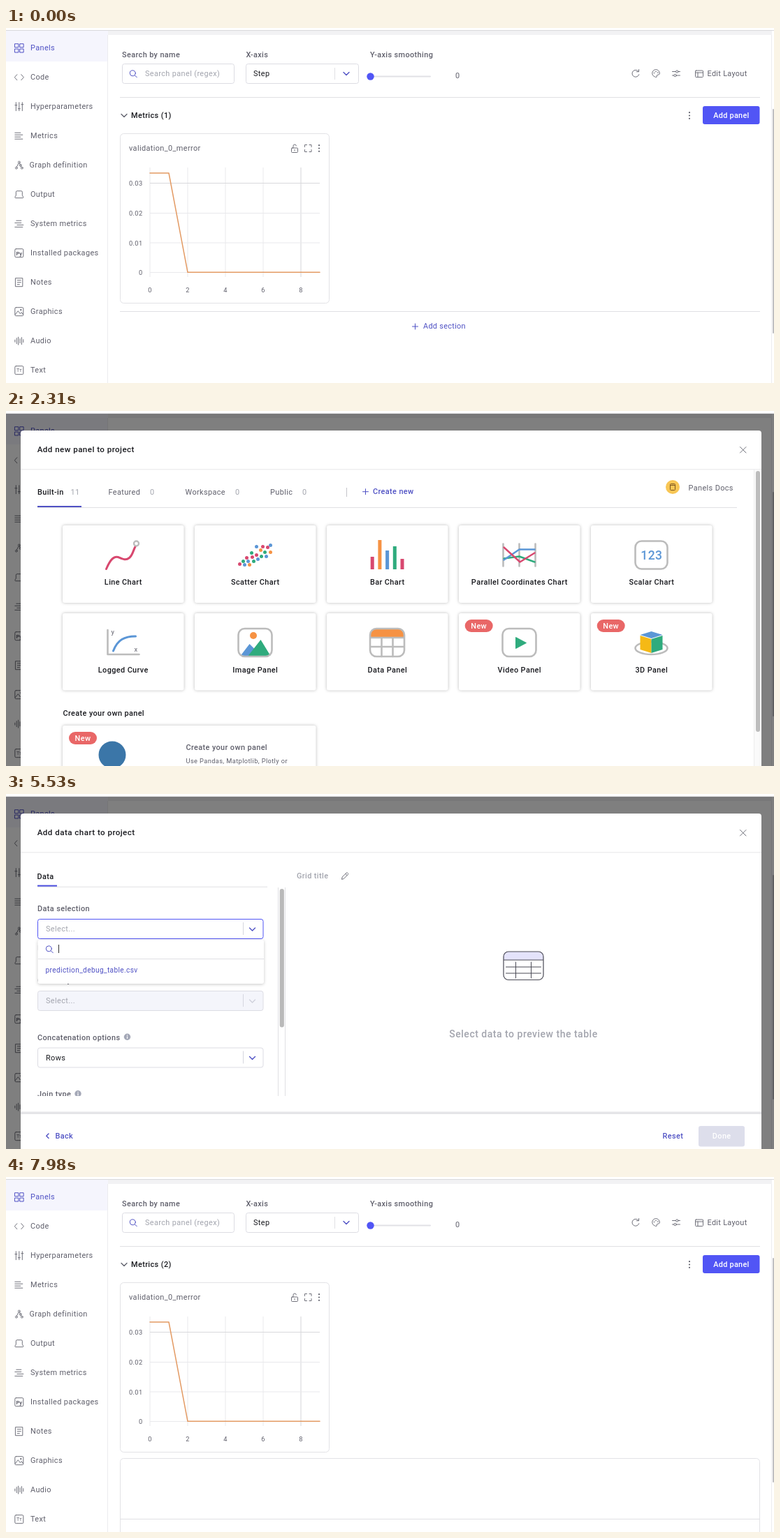
An HTML page for the animation above (8000 ms loop, 1099x509 px).

```html
<!DOCTYPE html>
<html lang="en">
<head>
<meta charset="utf-8">
<title>Add a data panel</title>
<style>
html, body { margin: 0; width: 100%; height: 100%; overflow: hidden; background: #fff; }
svg { display: block; width: 1099px; height: 509px; }
text { font: 10.9px Roboto, Arial, sans-serif; letter-spacing: .38px; fill: #5f5f6b; white-space: pre; }
.m { font-weight: 500; }
.dark { fill: #191a1f; }
.pale { fill: #a3a5ae; }
.brand { fill: #4f51c4; }
.white { fill: #fff; }
.h { font-size: 11.6px; font-weight: 500; letter-spacing: .45px; fill: #191a1f; }
.s { font-size: 9.24px; letter-spacing: .4px; }
.cell { letter-spacing: .2px; fill: #22232a; }
.mid { text-anchor: middle; }
.line { fill: none; stroke: #70717b; stroke-linecap: round; stroke-linejoin: round; }
.blue { stroke: #4f51c4; }
.rule { fill: none; stroke: #e0e0e4; }
.art { fill: none; stroke-width: 2.6; stroke-linecap: round; stroke-linejoin: round; }
.card { fill: #fff; filter: drop-shadow(0 0 2px rgba(0, 0, 0, .27)); }
.fade { animation: fade 8s step-end infinite; }
@keyframes fade {
  0% { opacity: 0; }
  27.125% { opacity: .15; }
  28% { opacity: .8; }
  28.875% { opacity: 1; }
  99.75% { opacity: 0; }
}
</style>
</head>
<body>
<svg id="stage" viewBox="0 0 1099 509"></svg>
<script>
const LOOP = 8000;
const rules = new Map();

// Wraps content so that it is visible only from a to b (ms).
function show(a, b, content) {
  const name = `on${a}to${b}`;
  const pct = t => t / LOOP * 100 + '%';
  rules.set(name, `@keyframes ${name} { 0% { opacity: 0 } ${pct(a)} { opacity: 1 } ${b < LOOP ? pct(b) + ' { opacity: 0 }' : ''} }
    .${name} { animation: ${name} ${LOOP}ms step-end infinite }`);
  return `<g class="${name}">${content}</g>`;
}

const text = (x, y, str, cls = '', extra = '') => `<text x="${x}" y="${y}" class="${cls}" ${extra}>${str}</text>`;
const path = (d, cls = 'line', extra = '') => `<path d="${d}" class="${cls}" ${extra}/>`;
const rect = (x, y, w, h, fill, r = 0, extra = '') =>
  `<rect x="${x}" y="${y}" width="${w}" height="${h}" rx="${r}" fill="${fill}" ${extra}/>`;
const frame = (x, y, w, h, r = 3, fill = '#fff', stroke = '#dcdce3') => rect(x, y, w, h, fill, r, `stroke="${stroke}"`);
const dot = (x, y, r, fill, extra = '') => `<circle cx="${x}" cy="${y}" r="${r}" fill="${fill}" ${extra}/>`;
const at = (x, y, content) => `<g transform="translate(${x} ${y})">${content}</g>`;
const kebab = (x, y) => [-4.3, 0, 4.3].map(d => dot(x, y + d, 1.1, '#62636e')).join('');
const chevron = (x, y, stroke = '#4f51c4') => path(`M${x - 4} ${y - 2}l4 4 4-4`, 'line', `style="stroke:${stroke};stroke-width:1.4"`);
const pencil = (x, y) => at(x, y, path('M-4.5 4.5l.7-3 6-6a1 1 0 0 1 1.4 0l.9.9a1 1 0 0 1 0 1.4l-6 6zM.8-3.2l2.4 2.4'));
const lens = (x, y) => at(x, y, `<circle cx="-.7" cy="-.7" r="4" class="line blue"/>` + path('M2.3 2.3l3 3', 'line blue'));
const info = (x, y) => dot(x, y, 4.7, '#a4a8b7') + rect(x - .6, y - .8, 1.2, 3.4, '#fff') + dot(x, y - 2.4, .75, '#fff');

/* ---------- workspace ---------- */
const box = '<rect x="-6" y="-6" width="12" height="12" rx="1.5" class="line"/>';
const menu = [
  ['Panels', path('M-6-6h5v5h-5zM1.3-6h5v5h-5zM-6 1.3h5v5h-5zM1.3 1.3h5v5h-5z', 'line blue')],
  ['Code', path('M-3-4l-3.5 4L-3 4M3-4l3.5 4L3 4')],
  ['Hyperparameters', path('M-4.5-6v12M0-6v12M4.5-6v12M-6-2h3M-1.5 3h3M3-3h3')],
  ['Metrics', path('M-6-4.5h8M-6-1.5h11M-6 1.5h8M-6 4.5h11')],
  ['Graph definition', path('M-.8-2.8l-2.6 5.2M.6-2.8l1 2M2.2 1l1 1.8') + [[0, -4.3], [-4, 4], [1.8, 0], [4, 4]].map(p => `<circle cx="${p[0]}" cy="${p[1]}" r="1.4" class="line"/>`).join('')],
  ['Output', path('M-4.5 1v-4.5q0-1.5 1.5-1.5h6q1.5 0 1.5 1.5v4.5l1.5 3q0 1-1 1h-10q-1 0-1-1z')],
  ['System metrics', path('M-4-4.5h7M-6-1.3h9M-3 1.7h9M-6 4.7h11')],
  ['Installed packages', box + text(0, 2.8, 'Py', 'mid', 'style="font-size:7.5px;font-weight:700;letter-spacing:0"')],
  ['Notes', path('M-5-6h10v12h-10zM-2.5-3h5M-2.5 0h5M-2.5 3h3')],
  ['Graphics', box + path('M-5.5 4l4-5 3 4 2-2 2 3') + dot(2.5, -2.5, 1.1, '#62636e')],
  ['Audio', path('M-6-1.5v3M-3.6-4v8M-1.2-5.5v11M1.2-3v6M3.6-5v10M6-2v4')],
  ['Text', box + text(0, 2.5, 'Tт', 'mid', 'style="font-size:7px;letter-spacing:0"')],
];

const sidebar = rect(0, 4, 146, 44, '#f5f5fd') +
  menu.map(([label, icon], i) =>
    at(18.8, 28.7 + 42 * i, icon) + text(i === 4 ? 33.5 : 35, 32.3 + 42 * i, label, i ? '' : 'brand')).join('');

function chart() {
  const xs = [206, 260, 314, 368, 422], ys = [350.5, 308, 265.5, 222.5];
  return frame(163.5, 151.5, 299, 243, 5, '#fff', '#e2e2e6') +
    text(176, 176, 'validation_0_merror') +
    `<rect x="408.5" y="172" width="9" height="6.5" rx="1" class="line"/>` + path('M411 172v-2.5a2.2 2.2 0 0 1 4.4-.6M413 174.5v1.5') +
    path('M427.5 170.5v-3h3M434 167.5h3v3M437 174.5v3h-3M430.5 177.5h-3v-3') + kebab(448, 172.5) +
    xs.map((x, i) => path(`M${x} 200V357`, 'rule', `style="stroke:${i === 4 ? '#d4d4d8' : '#e9e9ec'}"`) +
      text(x, 378.5, 2 * i, 's mid')).join('') +
    ys.map((y, i) => path(`M206 ${y}H449`, 'rule', `style="stroke:${i === 3 ? '#d9d9dc' : '#e9e9ec'}"`) +
      text(195.5, y + 3.5, i ? '0.0' + i : '0', 's', 'text-anchor="end"')).join('') +
    path('M206 208H233L260 350.3H449', 'art', 'style="stroke:#e39a63;stroke-width:1.5"');
}

const toolbar =
  text(166, 42, 'Search by name', 'm') + text(343.5, 42, 'X-axis', 'm') + text(521, 42, 'Y-axis smoothing', 'm') +
  frame(166.5, 51.5, 160, 28) + lens(182, 65.5) + text(199, 69, 'Search panel (regex)', 'pale') +
  frame(343.5, 51.5, 161, 28) + text(354, 69, 'Step', 'dark') + path('M470.5 57v17', 'rule') + chevron(487, 65.5) +
  rect(521, 68.5, 87, 2, '#e1e1e6', 1) + dot(521.5, 69.5, 5.2, '#5155f5') + text(643, 72, '0') +
  path('M905 62.2a5 5 0 1 0 .8 4.5M905.6 59.5v3.2h-3.2') +
  path('M928 69.8a5.3 5.3 0 1 1 7.2-3.8q-.6 1.3-2.4 1.1-1.8 0-1.4 2 0 2-1.4 1.4z') +
  [[927.5, 64.5], [930, 62.5], [932.8, 64]].map(p => dot(...p, .8, '#62636e')).join('') +
  path('M953.5 62.5h5M962 62.5h2.5M953.5 68h2M959.5 68h5') +
  '<circle cx="960.3" cy="62.5" r="1.7" class="line"/><circle cx="957.5" cy="68" r="1.7" class="line"/>' +
  '<rect x="986.5" y="61" width="11" height="9.5" rx="1" class="line"/>' + path('M986.5 64h11M990 64v6.5') +
  text(1003.5, 69, 'Edit Layout', '', 'style="letter-spacing:.3px"');

const addButton = fill => rect(997, 112, 81.5, 26, fill, 3) + text(1037.9, 129, 'Add panel', 'm white mid', 'style="letter-spacing:.25px"');

const workspace =
  rect(0, 3, 1099, 1, '#d9d9dc') + sidebar +
  rect(146, 4, 950, 6, '#f2f2f4') + rect(145, 10, 1, 499, '#ececef') + rect(1095, 10, 1, 499, '#ececef') +
  rect(1097, 116, 2, 322, '#bfbfc2', 1) +
  toolbar + path('M163 99.5H1079', 'rule') +
  chevron(169, 125.5, '#62636e') +
  show(0, 7980, text(179, 128.8, 'Metrics (1)', 'm dark')) + show(7980, LOOP, text(179, 128.8, 'Metrics (2)', 'm dark')) +
  show(1260, 2170, pencil(249, 125.5)) + kebab(978, 125.5) +
  addButton('#5155f5') + show(1260, 1820, addButton('#3338cf')) + show(1820, 2170, addButton('#4246e2')) +
  chart() +
  show(0, 7980, path('M163 406.5H1079', 'rule') + path('M581.5 428h8M585.5 424v8', 'line blue') +
    text(597, 431.3, 'Add section', 'brand', 'style="letter-spacing:.3px"')) +
  show(7980, LOOP, frame(163.5, 403.5, 915, 130, 5, '#fff', '#e2e2e6') + path('M163 490.5H1079', 'rule'));

/* ---------- panel gallery ---------- */
const RED = '#d8486f', BLUE = '#5b96d6', GREEN = '#2fab7d', ORANGE = '#f69243', GREY = '#bcbcbc';
const stroke = (d, c, w = 2.6) => path(d, 'art', `style="stroke:${c};stroke-width:${w}"`);
const tile = (w = 48) => `<rect x="${-w / 2}" y="-20" width="${w}" height="40" rx="9" class="art" stroke="${GREY}"/>`;

function scatter() {
  const pts = [[-22, 13], [-17, 9], [-15, 14], [-12, 4], [-10, 9], [-8, 14], [-5, -3], [-4, 3], [-2, 9], [2, -12],
    [2, 0], [4, 6], [8, -7], [9, 2], [11, -12], [14, -4], [16, 2], [18, -11], [22, -14], [22, -4]];
  const tones = [RED, GREEN, BLUE, RED, BLUE, ORANGE, GREEN];
  return pts.map(([x, y], i) => dot(x, y, 2.5, tones[i % 7])).join('');
}

const gallery = [
  ['Line Chart', stroke('M-24 20C-19 8-14 1-7 3 0 6 4 8 9 4 14 0 14-6 18-13', RED, 3) + dot(19, -16.5, 3.5, '#fff', `stroke="${GREY}" stroke-width="2.4"`)],
  ['Scatter Chart', scatter()],
  ['Bar Chart', [[18, RED], [42, ORANGE], [27, BLUE], [33, GREEN], [15, RED]].map(([h, c], i) => rect(-23.8 + i * 10.7, 20.5 - h, 5, h, c)).join('')],
  ['Parallel Coordinates Chart', stroke('M-23-16V16M0-16V16M23-16V16', GREY) + stroke('M-22 5L0 2 22 10', GREEN, 2.4) +
    stroke('M-22 7L0-8H22', BLUE, 2.4) + stroke('M-22-11L1 10 22-3', RED, 2.4)],
  ['Scalar Chart', tile(46) + text(.3, 6.3, '123', 'm mid', `style="font-size:17.5px;fill:${BLUE}"`)],
  ['Logged Curve', stroke('M-22-18V17H23', GREY) + stroke('M-14 12C-8-4 2-9 18-9', BLUE, 3) +
    text(-17, -12, 'y', 's') + text(16, 13, 'x', 's')],
  ['Image Panel', dot(-2.5, -10, 5, ORANGE) + path('M-21 19L-8 2 0 10-6 19z', '', `fill="${BLUE}"`) + path('M-10 19L8-4 22 19z', '', `fill="${GREEN}"`) + tile()],
  ['Data Panel', path('M-24-7V-12q0-8 8-8H16q8 0 8 8V-7z', '', `fill="${ORANGE}"`) + tile(49) + stroke('M-24-7H24M-24 6H24M-8-7V20M8-7V20', GREY)],
  ['Video Panel', tile() + path('M-5-7.5L10 .5-5 8.5z', '', `fill="${GREEN}" stroke="${GREEN}" stroke-linejoin="round"`)],
  ['3D Panel', `<ellipse cy="8" rx="23" ry="9" class="art" stroke="${GREY}"/>` + path('M-16-11L0-16 16-11 0-6z', '', `fill="${BLUE}"`) +
    path('M-16-10L0-5V15L-16 10z', '', 'fill="#f5b915"') + path('M16-10L0-5V15L16 10z', '', `fill="${GREEN}"`)],
];
const badge = (x, y) => rect(x, y, 40, 18, '#e96767', 9) + text(x + 20, y + 12.8, 'New', 'm white mid');
const hovers = { 4: [2800, 2870], 9: [2870, 2940], 8: [2940, 3080], 7: [3080, 4130] };

function galleryCard([label, icon], i) {
  const x = 81 + 189 * (i % 5), low = i > 4, y = low ? 290 : 164, h = low ? 110.5 : 111;
  return rect(x, y, 173.5, h, '#fff', 3, 'class="card"') +
    (hovers[i] ? show(...hovers[i], rect(x, y, 173.5, h, '#f4f4fe', 3)) : '') +
    at(x + 86.5, low ? 332 : 206.5, icon) +
    text(x + 86.8, low ? 374.8 : 248.8, label, 'm dark mid') + (i > 7 ? badge(x + 8.7, 299) : '');
}

const tab = (x, label, n, nx, cls = '') => text(x, 119.8, label, cls) + text(nx, 119.8, n, 'pale');
const galleryView =
  text(44.7, 59.3, 'Add new panel to project', 'h') +
  tab(45, 'Built-in', 11, 92.5, 'm dark') + tab(146.5, 'Featured', 0, 206) + tab(256.5, 'Workspace', 0, 328) + tab(378, 'Public', 0, 424) +
  path('M487.5 110v13', 'rule', 'style="stroke:#c4c4ca"') + path('M510.5 115.7h8M514.5 111.7v8', 'line blue') + text(525, 119, 'Create new', 'm brand') +
  dot(954, 109, 10, '#f8c655') + '<rect x="950.5" y="104.5" width="7" height="9" rx="1" fill="none" stroke="#7a5420"/>' +
  path('M950.5 106.5h7', '', 'stroke="#7a5420"') + text(976.5, 113.8, 'Panels Docs') +
  path('M45 138.5H1046', 'rule') + rect(45, 136, 63, 2, '#4f51c4') +
  rect(1070, 84.5, 11, 425, '#fafafa') + path('M1070.5 84V509', 'rule', 'style="stroke:#ededed"') + rect(1073, 86, 6, 374, '#bdbdbd', 3) +
  gallery.map(galleryCard).join('') +
  text(81.5, 437, 'Create your own panel', 'm dark') +
  rect(81, 451, 362.5, 90, '#fff', 3, 'class="card"') + badge(90, 460) + dot(152, 493, 19.5, '#3b76a8') +
  text(257.5, 485.5, 'Create your own panel', 'm') + text(257.5, 505.3, 'Use Pandas, Matplotlib, Plotly or', 's');

/* ---------- data chart form ---------- */
const CSV = 'prediction_debug_table.csv';
function field(y, value, on, border) {
  return frame(45.5, y + .5, 322.5, 28, 3, on ? '#fff' : '#f4f5fb', border) +
    text(57, y + 18, value, value === 'Select...' ? 'pale' : 'dark') +
    path(`M339.5 ${y + 5}v18`, 'rule', 'style="stroke:#d6d7df"') + chevron(352.5, y + 15, on ? '#4f51c4' : '#cfd1dc');
}

const picker =
  rect(45.5, 209, 323.5, 63, '#fff', 3, 'style="filter:drop-shadow(0 1px 2px rgba(0,0,0,.22))"') +
  lens(62, 222.5) + show(5180, 5670, rect(75, 216, 1, 12, '#333')) + path('M46 236.5H369', 'rule') +
  show(5180, 5530, text(56.5, 256, CSV, 'dark', 'style="font-size:10.1px"')) +
  show(5530, 6090, text(56.5, 256, CSV, 'brand', 'style="font-size:10.1px"'));

const preview = at(740.5, 246,
  rect(-28.5, -20, 57, 40.5, '#fff', 7) + path('M-28.5-8V-13q0-7 7-7H21.5q7 0 7 7V-8z', '', 'fill="#e4e3fb"') +
  '<rect x="-28.5" y="-20" width="57" height="40.5" rx="7" fill="none" stroke="#4a4a55" stroke-width="1.2"/>' +
  path('M-28-8H28M-25 2H25M-25 11H25M-11-5V18M11-5V18', 'line', 'style="stroke:#4a4a55"')) +
  text(740.5, 348.5, 'Select data to preview the table', 'm mid pale', 'style="font-size:14px;letter-spacing:.5px"');

function table() {
  const xs = [431, 568.5, 705.5, 842.7, 980];
  const heads = ['Experiment Key', 'Idx', 'Sepal Length (cm)', 'Sepal Width (cm)', 'Petal Length (cm)'];
  const rows = ['11 4.8 3.4 1.6', '54 6.5 2.8 4.6', '28 5.2 3.4 1.4', '132 6.4 2.8 5.6', '61 5.9 3 4.2', '26 5 3.4 1.6', '9 4.9 3.1 1.5'];
  const rowY = i => 201.5 + 28.2 * i;
  return frame(416.5, 405.5, 648, 28, 0, '#fff', '#e4e4e7') + rect(416.5, 167.5, 648, 238, '#fff', 1) +
    `<g clip-path="url(#grid)">` +
    heads.map((s, i) => text(xs[i], 188.5, s, 'cell') + (i < 4
      ? path(`M${528.5 + 137.2 * i} 180.5h9m-9 3h9m-9 3h9`, 'line', 'style="stroke:#33343c;stroke-linecap:butt"') +
        rect(552.3 + 137.3 * i, 180, 2, 9, '#dadbe0') : '')).join('') + '</g>' +
    `<g clip-path="url(#rows)">` +
    rows.map((row, i) => ['74697059c1ea418...', ...row.split(' ')].map((s, k) => text(xs[k], rowY(i) + 18.3, s, 'cell')).join('') +
      path(`M417 ${Math.round(rowY(i) + 27.7) + .5}H1054`, 'rule', 'style="stroke:#e9e9ec"')).join('') + '</g>' +
    path('M417 200.5H1064', 'rule', 'style="stroke:#c6c7cc"') + path('M1054.5 201V395.5M417 395.5H1054.5', 'rule', 'style="stroke:#e4e4e7"') +
    rect(1056.5, 203.5, 5.5, 39.5, '#bfbfbf', 2.7) + rect(418.5, 397.5, 365.5, 6, '#bfbfbf', 3) +
    '<rect x="416.5" y="167.5" width="648" height="238" rx="1" fill="none" stroke="#bcbdc3"/>' +
    [[433, 'Total rows:'], [504.3, '||'], [516.8, 'Total tables:']].map(([x, s]) => text(x, 423.3, s, 's dark')).join('') +
    [[485, 30], [574.8, 1]].map(([x, n]) => text(x, 423.3, n, 's dark', 'style="font-weight:700"')).join('');
}

const doneButton = fill => rect(991, 476, 66, 29.5, fill, 3) + text(1024.2, 493.8, 'Done', 'm white mid');

const formView =
  text(44.7, 59.3, 'Add data chart to project', 'h') +
  text(44.5, 122, 'Data', 'm dark') + path('M45 133.2H374', 'rule') + rect(45, 130.6, 28, 2, '#4a4ddd') +
  text(45, 168, 'Data selection', 'm') +
  show(4130, 4340, field(179, 'Select...', false)) + show(4340, 4760, field(179, 'Select...', true)) +
  show(4760, 6090, field(179, 'Select...', true, '#5155f5')) +
  show(6090, LOOP, field(179, CSV, true) + path('M324.2 190.7l5.6 5.6m0-5.6l-5.6 5.6', 'line', 'style="stroke:#85868f"')) +
  text(45, 224.4, 'Files that are larger than 10MB will be disabled and wont be displayed', 's', 'style="fill:#8f909a"') +
  text(45, 271.4, 'Choose your index', 'm') + info(151.5, 267) +
  show(4130, 6160, field(282, 'Select...', false)) + show(6160, 6370, field(282, 'Select...', true)) + show(6370, LOOP, field(282, 'idx', true)) +
  text(45, 353, 'Concatenation options', 'm') + info(173.5, 348.3) + field(363.5, 'Rows', true) +
  `<g clip-path="url(#form)">${text(45, 434, 'Join type', 'm')}${info(103, 429.8)}</g>` +
  path('M389.5 134V433M399.5 134V433', 'rule') + rect(391.7, 136, 6.2, 198.5, '#bababa', 3) +
  text(416, 121, 'Grid title', 'm pale') +
  show(4130, 6090, pencil(485, 117.5)) + show(6090, LOOP, text(466, 121, CSV, 'm') + pencil(622, 117.5)) +
  show(4130, 6160, preview) + show(6370, LOOP, table()) +
  rect(21, 455.5, 1060, 3.5, '#e5e5e8') +
  path('M61 487l-3.2 3.3 3.2 3.3', 'line blue', 'style="stroke-width:1.4"') + text(70.5, 493.8, 'Back', 'm brand') + text(939.5, 493.8, 'Reset', 'm brand') +
  doneButton('#dddeeb') + show(6160, 7140, doneButton('#5155f5')) + show(7140, 7770, doneButton('#3338cf')) + show(7770, LOOP, doneButton('#4246e2')) +
  show(5180, 6090, picker);

// The shade fades on its own, so that it also darkens what shows through the dialog.
const shade = rect(0, 4, 1099, 505, 'rgba(0,0,0,.5)', 0, 'class="fade"');
const dialog = `<g class="fade">` +
  path('M21 509V32q0-4 4-4H1077q4 0 4 4V509z', '', 'fill="#fff"') + path('M21 83.8H1081', 'rule', 'style="stroke:#e6e6e9"') +
  path('M1050.5 51.5l8.5 8.5m0-8.5l-8.5 8.5') +
  show(0, 4130, galleryView) + show(4130, LOOP, formView) + '</g>';

const clip = (id, x, y, w, h) => `<clipPath id="${id}">${rect(x, y, w, h, '#000')}</clipPath>`;
const defs = `<defs>${clip('grid', 417, 168, 647, 33)}${clip('rows', 417, 201, 637, 194)}${clip('form', 40, 420, 340, 13)}</defs>`;
const style = document.createElement('style');
style.textContent = [...rules.values()].join('\n');
document.head.append(style);
document.getElementById('stage').innerHTML = defs + workspace + shade + dialog;
</script>
</body>
</html>
```
